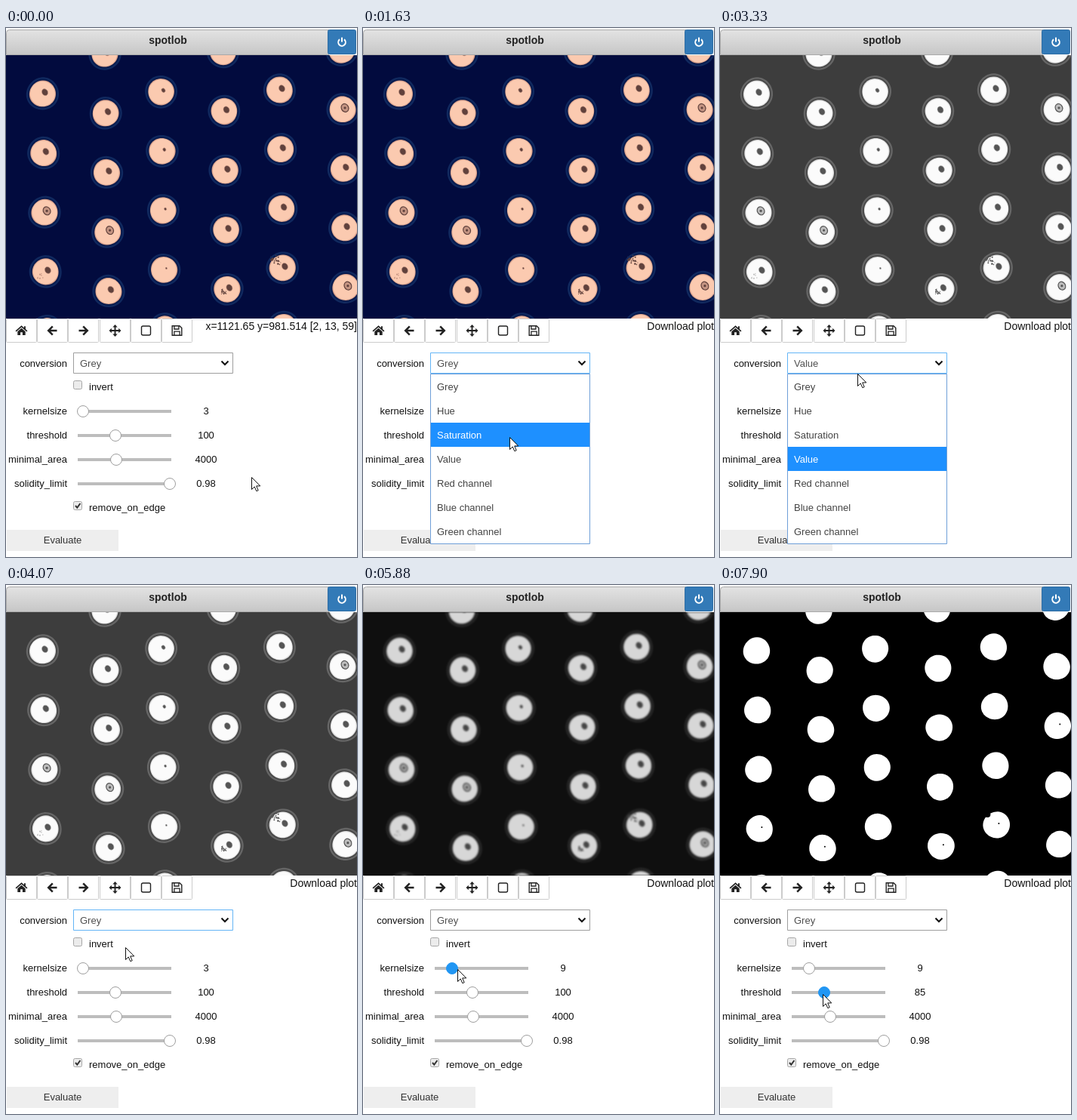
Recreate the animation shown at these times as an HTML page with a canvas. Size 465 by 701 pixels, loop 8 s.

```html
<!DOCTYPE html>
<html lang="en">
<head>
<meta charset="utf-8">
<title>spotlob</title>
<style>
html, body { margin: 0; width: 100%; height: 100%; overflow: hidden; background: #fff; }
canvas { display: block; width: 465px; height: 701px; }
</style>
</head>
<body>
<canvas id="stage"></canvas>
<script>
const W = 465, H = 701, LOOP = 8000, TOP = 36, PLOT_H = 349;
const SANS = '"Liberation Sans", Arial, sans-serif';
const dpr = window.devicePixelRatio || 1;

function makeCanvas(el, w, h) {
  el.width = w * dpr;
  el.height = h * dpr;
  const c = el.getContext('2d');
  c.scale(dpr, dpr);
  return c;
}
const g = makeCanvas(document.getElementById('stage'), W, H);

// ---------- microscope picture ----------
const PALETTES = {
  color: { bg: '#020b3e', halo: '#071a4d', ring: '#10295f', rim: '#c98f7c', fill: '#fbcab0',
           mid: '#c49482', dark: '#60413c' },
  value: { bg: '#3d3d3d', halo: '#484848', ring: '#666', rim: '#c9c9c9', fill: '#fbfbfb',
           mid: '#bdbdbd', dark: '#555' },
  grey: { bg: '#0f0f0f', halo: '#191919', ring: '#2a2a2a', rim: '#989898', fill: '#d7d7d7',
          mid: '#a0a0a0', dark: '#454545' }
};
// spots named by column and row
const PALE = ['03', '13', '51', '54'];
const HOLED = ['04', '14', '34', '44', '52'];

function seeded(seed) {
  return () => (seed = (seed * 16807) % 2147483647) / 2147483647;
}

function dot(c, x, y, r, color) {
  c.fillStyle = color;
  c.beginPath();
  c.arc(x, y, r, 0, 7);
  c.fill();
}

function grains(c, x, y, spread, count, color) {
  const rnd = seeded(count * 97);
  for (let i = 0; i < count; i++) {
    dot(c, x + (rnd() - 0.5) * spread, y + (rnd() - 0.5) * spread, 0.4 + 0.8 * rnd(), color);
  }
}

// columns stand in two staggered sets; the whole grid leans slightly
function eachSpot(fn) {
  for (let col = 0; col < 6; col++) {
    for (let row = 0; row < 6; row++) {
      const odd = col % 2;
      fn({
        x: 47.2 + 78.5 * col + 5 * odd + 1.3 * row,
        y: 8.5 - 1.25 * col + 27 * odd + 78.6 * row,
        r: col === 2 ? 3.2 - 0.5 * row : 4.3,
        phase: col * 7 + row * 3,
        key: `${col}${row}`
      });
    }
  }
}

function blob(c, { x, y, phase }, r) {
  c.beginPath();
  for (let a = 0; a < 6.28; a += 0.12) {
    const k = r * (1 + 0.01 * Math.sin(2 * a + phase) + 0.012 * Math.sin(3 * a + 2 * phase));
    c.lineTo(x + k * Math.cos(a), y + k * Math.sin(a));
  }
  c.closePath();
}

function nucleus(c, x, y, r, pale, p) {
  c.beginPath();
  c.ellipse(x, y, r * 0.9, r * 1.08, -0.5, 0, 7);
  c.fillStyle = pale ? p.mid : p.dark;
  c.fill();
  c.strokeStyle = pale ? p.dark : p.mid;
  c.lineWidth = pale ? 1.2 : 0.6;
  c.stroke();
  if (pale) dot(c, x, y, 1.6, p.dark);
}

function newPlot(bg) {
  const el = document.createElement('canvas');
  const c = makeCanvas(el, W, PLOT_H);
  c.fillStyle = bg;
  c.fillRect(0, 0, W, PLOT_H);
  c.translate(0, -TOP);
  return [el, c];
}

function microscope(p) {
  const [el, c] = newPlot(p.bg);
  eachSpot(s => {
    blob(c, s, 20.5);
    c.fillStyle = p.halo;
    c.fill();
    c.strokeStyle = p.ring;
    c.lineWidth = 2.2;
    c.stroke();
    const shade = c.createRadialGradient(s.x, s.y, 0, s.x, s.y, 17.8);
    shade.addColorStop(0.88, p.fill);
    shade.addColorStop(1, p.rim);
    blob(c, s, 17.5);
    c.fillStyle = shade;
    c.fill();
    const pale = PALE.includes(s.key);
    nucleus(c, s.x + 3, s.y - 2, pale ? 5.2 : s.r, pale, p);
    if (s.key === '34') grains(c, s.x - 4, s.y + 3, 7, 14, p.dark);
    if (s.key === '44') grains(c, s.x - 9, s.y - 11, 14, 24, p.dark);
    if (s.key === '04') grains(c, s.x - 7, s.y + 6, 7, 9, p.mid);
  });
  return el;
}

function blurred(src) {
  const [el, c] = newPlot(PALETTES.grey.bg);
  c.filter = `blur(${0.8 * dpr}px)`;
  c.drawImage(src, 0, TOP, W, PLOT_H);
  return el;
}

function binary() {
  const [el, c] = newPlot('#000');
  eachSpot(s => {
    blob(c, s, 17.7);
    c.fillStyle = '#fff';
    c.fill();
    if (HOLED.includes(s.key)) dot(c, s.x + 3, s.y - 2, 1, '#000');
    if (s.key === '44') dot(c, s.x - 12, s.y - 14, 4, '#000');
  });
  return el;
}

const plots = {
  color: microscope(PALETTES.color),
  value: microscope(PALETTES.value),
  grey: microscope(PALETTES.grey),
  binary: binary()
};
plots.blur = blurred(plots.grey);

// ---------- pointer ----------
// start, end, goal x, goal y
const MOVES = [
  [70, 70, 216, 436], [220, 380, 222, 399], [460, 690, 215, 438],
  [690, 1160, 216, 483], [1240, 1420, 205, 528], [1500, 1860, 171, 570],
  [2560, 2890, 185, 427], [3120, 3320, 182, 458], [3430, 3820, 169, 474],
  [3990, 4760, 106, 509], [5160, 5620, 125, 509],
  [6360, 6650, 157, 556], [6800, 6890, 142, 531],
  [7330, 7410, 130, 527], [7490, 7580, 136, 542]
];
const HOP = 80;

// straight strokes, travelled in equal hops
function pointerAt(t) {
  let x = 325, y = 595;
  for (const [t0, t1, gx, gy] of MOVES) {
    if (t < t0) break;
    const gaps = Math.round((t1 - t0) / HOP);
    const hop = gaps ? Math.floor((t - t0) / (t1 - t0) * gaps + 1e-6) : 0;
    const k = Math.min(1, (hop + 1) / (gaps + 1));
    x += (gx - x) * k;
    y += (gy - y) * k;
  }
  return [Math.round(x), Math.round(y)];
}

// ---------- widgets ----------
const OPTIONS = ['Grey', 'Hue', 'Saturation', 'Value', 'Red channel', 'Blue channel', 'Green channel'];

function text(s, x, y, align = 'left', color = '#111', font = '13px ') {
  g.font = font + SANS;
  g.textAlign = align;
  g.fillStyle = color;
  g.fillText(s, x, y);
}

function box(x, y, w, h, fill, stroke, r = 0, width = 1) {
  g.beginPath();
  g.roundRect(x + 0.5, y + 0.5, w - 1, h - 1, r);
  g.fillStyle = fill;
  g.fill();
  g.strokeStyle = stroke;
  g.lineWidth = width;
  g.stroke();
}

function line(d, width, color = '#222') {
  g.strokeStyle = color;
  g.lineWidth = width;
  g.stroke(new Path2D(d));
}

function solid(d, color = '#222') {
  g.fillStyle = color;
  g.fill(new Path2D(d));
}

function at(x, y, draw) {
  g.save();
  g.translate(x, y);
  draw();
  g.restore();
}

function arrow() {
  line('M6 0H-5M0.3-5.6L-5.3 0L0.3 5.6', 2.5);
}

function cross() {
  line('M-6 0H6M0-6V6', 1.9);
  for (let i = 0; i < 4; i++) {
    solid('M-8 0l3.4-3.2v6.4Z');
    g.rotate(Math.PI / 2);
  }
}

const ICONS = [
  () => {
    line('M-7.4.8L0-5.6L7.4.8', 1.7);
    solid('M-5.2 1.2L0-3.2L5.2 1.2V6H1.4V2.2H-1.4V6H-5.2ZM3.4-5.8H5.4V-2H3.4Z');
  },
  arrow,
  () => { g.scale(-1, 1); arrow(); },
  cross,
  () => box(-6.5, -6.5, 13, 13, '#fff', '#222', 2, 1.4),
  () => {
    line('M-6.3-6.3H3.4L6.3-3.4V6.3H-6.3Z', 1.4);
    line('M-3.6 6V1.2H3.6V6M-3.6-6V-2H2.4V-6', 1.3);
  }
];

function titleBar() {
  const shade = g.createLinearGradient(0, 2, 0, 36);
  shade.addColorStop(0, '#e3e3e3');
  shade.addColorStop(1, '#c6c6c6');
  box(0, 2, 428, 34, shade, '#a9a9a9', [4, 0, 0, 0]);
  text('spotlob', 214.5, 21, 'center', '#222', 'bold 14px ');
  box(426, 2, 38, 33, '#337ab7', '#2e6da4', 2);
  at(445, 18.5, () => {
    g.beginPath();
    g.arc(0, 0.4, 4.8, -0.9, Math.PI + 0.9);
    g.strokeStyle = '#fff';
    g.lineWidth = 2;
    g.stroke();
    line('M0-6V0', 2, '#fff');
  });
}

function toolbar(px, py) {
  ICONS.forEach((icon, i) => {
    const x = Math.round(i * 41.2);
    const hover = py >= 385 && py < 417 && px >= x && px < x + 41;
    box(x, 385, 41, 32, hover ? '#e6e6e6' : '#fff', hover ? '#adadad' : '#ccc', 1);
    at(x + 20.5, 401, icon);
  });
}

function slider(label, y, x, value, hot) {
  text(label, 81, y + 4, 'right');
  g.fillStyle = '#bdbdbd';
  g.fillRect(95, y - 2, 124, 4);
  box(Math.round(x) - 8, y - 8, 16, 16, hot ? '#2196f3' : '#fff', hot ? '#2196f3' : '#9e9e9e', 7.5);
  text(value, 265, y + 4, 'center');
}

function checkbox(y, label, checked) {
  box(89, y, 12, 12, '#ececec', '#a6a6a6', 2);
  if (checked) line(`M92 ${y + 6}L94.3 ${y + 8.6}L98.4 ${y + 3}`, 2, '#333');
  text(label, 110, y + 13);
}

function select(value, focused) {
  text('conversion', 81, 449, 'right');
  box(89, 430, 212, 28, '#fff', focused ? '#64b5f6' : '#9e9e9e');
  text(value, 98, 449, 'left', '#505050');
  line('M285.5 441.5L290 446L294.5 441.5', 2, '#111');
}

function menu(py, current) {
  const row = Math.floor((py - 459) / 32);
  const active = row >= 0 ? row : OPTIONS.indexOf(current);
  box(89, 458, 212, 226, '#fff', '#6f9fd8');
  OPTIONS.forEach((name, i) => {
    const y = 459 + i * 32;
    if (i === active) {
      g.fillStyle = '#1e90ff';
      g.fillRect(90, y, 210, 32);
    }
    text(name, 98, y + 21, 'left', i === active ? '#fff' : '#444');
  });
}

function pointer(x, y) {
  at(x + 0.5, y + 0.5, () => {
    const d = 'M0 0V16L3.7 12.4L6.3 18.2L8.7 17.2L6.2 11.4H11.3Z';
    solid(d, '#fff');
    line(d, 1, '#111');
  });
}

function plotAt(t) {
  if (t < 2560) return plots.color;
  if (t < 4230) return plots.value;
  if (t < 5780) return plots.grey;
  return t < 7810 ? plots.blur : plots.binary;
}

function render(t) {
  const [px, py] = pointerAt(t);
  const choice = t >= 2270 && t < 3990 ? 'Value' : 'Grey';
  const open = (t >= 850 && t < 2270) || (t >= 3200 && t < 3990);
  const kernel = t < 5160 ? 3 : 3 + 2 * Math.min(3, Math.round((px - 106) / 6));
  const threshold = t < 7190 ? 100 : 100 + Math.round((px - 142) * 2.5);

  g.fillStyle = '#fff';
  g.fillRect(0, 0, W, H);
  titleBar();
  g.drawImage(plotAt(t), 0, TOP, W, PLOT_H);
  toolbar(px, py);
  text(t < 220 ? 'x=1121.65 y=981.514 [2, 13, 59]' : 'Download plot', 465, 400, 'right', '#111', '14px ');

  select(choice, t >= 850 && t < 5160);
  checkbox(467, 'invert', false);
  slider('kernelsize', 508, 102 + (kernel - 3) * 2.67, kernel, t >= 4680 && t < 7190);
  slider('threshold', 540, 101.8 + threshold * 0.43, threshold, t >= 6800);
  slider('minimal_area', 572, 146, 4000, false);
  slider('solidity_limit', 604, 217, '0.98', false);
  checkbox(627, 'remove_on_edge', true);
  g.fillStyle = '#eee';
  g.fillRect(1, 665, 148, 28);
  text('Evaluate', 75, 683, 'center', '#333');

  if (open) menu(py, choice);
  pointer(px, py);
}

const start = performance.now();
function tick() {
  render((performance.now() - start) % LOOP);
  requestAnimationFrame(tick);
}
tick();
</script>
</body>
</html>
```
